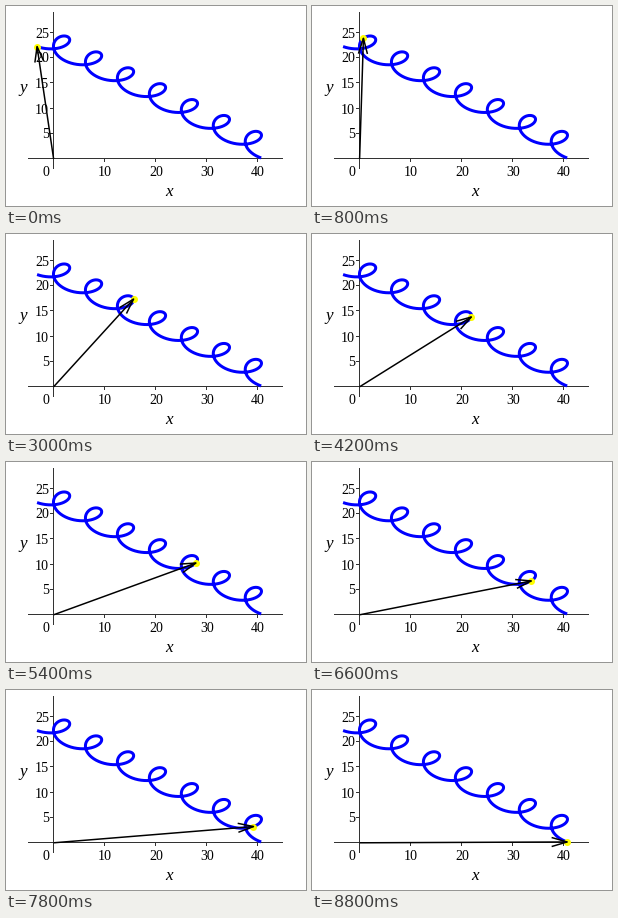
These frames come from a looping animation (300x200 px, 9000 ms). A matplotlib script:

```python
import math

import numpy as np
import matplotlib.pyplot as plt
from matplotlib.animation import FuncAnimation

WIDTH, HEIGHT, DPI = 300, 200, 100
PX = 72 / DPI                  # one pixel in points
X0, Y0 = 47.6, 152.8           # origin of the plot, in pixels
SX, SY = 5.087, 5.06           # pixels per unit
FRAMES, INTERVAL = 45, 200
T_START, T_END = -2, 42
HEAD_LENGTH, HEAD_HALF = 15.5, 4.5
AXIS = "#333333"


def position(t):
    """Pixel position of the particle at time t."""
    x = t + 3 * np.cos(t)
    y = 23 - t / 2 + 2 * np.sin(t)
    return X0 + SX * x, Y0 - SY * y


def center(v):
    """Centre of the pixel that holds v."""
    return math.floor(v) + 0.5


fig = plt.figure(figsize=(WIDTH / DPI, HEIGHT / DPI), dpi=DPI, facecolor="white")
ax = fig.add_axes([0, 0, 1, 1])
ax.set_xlim(0, WIDTH)
ax.set_ylim(HEIGHT, 0)
ax.axis("off")


def line(xs, ys, width=1, color="black", z=1, **kw):
    return ax.plot(xs, ys, color=color, lw=width * PX, zorder=z, snap=False,
                   solid_capstyle="butt", **kw)[0]


def label(x, y, text, size=14, ha="center", style="normal"):
    ax.text(x, y, text, fontsize=size * PX, family="Liberation Serif",
            style=style, ha=ha, va="baseline", zorder=1)


# Axes, ticks and labels
axis_x, axis_y = center(X0), center(Y0)
line([22, 277], [axis_y, axis_y], color=AXIS)
line([axis_x, axis_x], [6, 163], color=AXIS)
for value in (10, 20, 30, 40):
    x = center(X0 + SX * value)
    line([x, x], [axis_y, axis_y + 3.5], color=AXIS)
    label(x + 0.5, 170, str(value))
for value in (5, 10, 15, 20, 25):
    y = center(Y0 - SY * value)
    line([axis_x - 3.5, axis_x], [y, y], color=AXIS)
    label(43, y + 5, str(value), ha="right")
label(40, 170, "0")
label(162.5, 190, "x", size=17, style="italic")
label(17.3, 86.5, "y", size=17, style="italic")

# Path, particle and position vector
line(*position(np.linspace(T_START, T_END, 1200)), width=3, color="#0000ff", z=2)
dot = line([], [], color="yellow", z=3, marker="o", markersize=7 * PX,
           markeredgewidth=0)
shaft = line([], [], width=1.5, z=4)
head = line([], [], width=1.5, z=4, solid_joinstyle="round")


def update(i):
    tip = np.array(position(T_START + (T_END - T_START) * i / (FRAMES - 1)))
    origin = np.array([X0, Y0])
    along = (tip - origin) / np.hypot(*(tip - origin))
    across = np.array([-along[1], along[0]])
    base = tip - HEAD_LENGTH * along
    wings = np.array([base + HEAD_HALF * across, tip, base - HEAD_HALF * across])
    dot.set_data([tip[0]], [tip[1]])
    shaft.set_data([X0, tip[0]], [Y0, tip[1]])
    head.set_data(wings[:, 0], wings[:, 1])
    return dot, shaft, head


anim = FuncAnimation(fig, update, frames=FRAMES, interval=INTERVAL,
                     repeat=True, repeat_delay=0)
plt.show()
```
